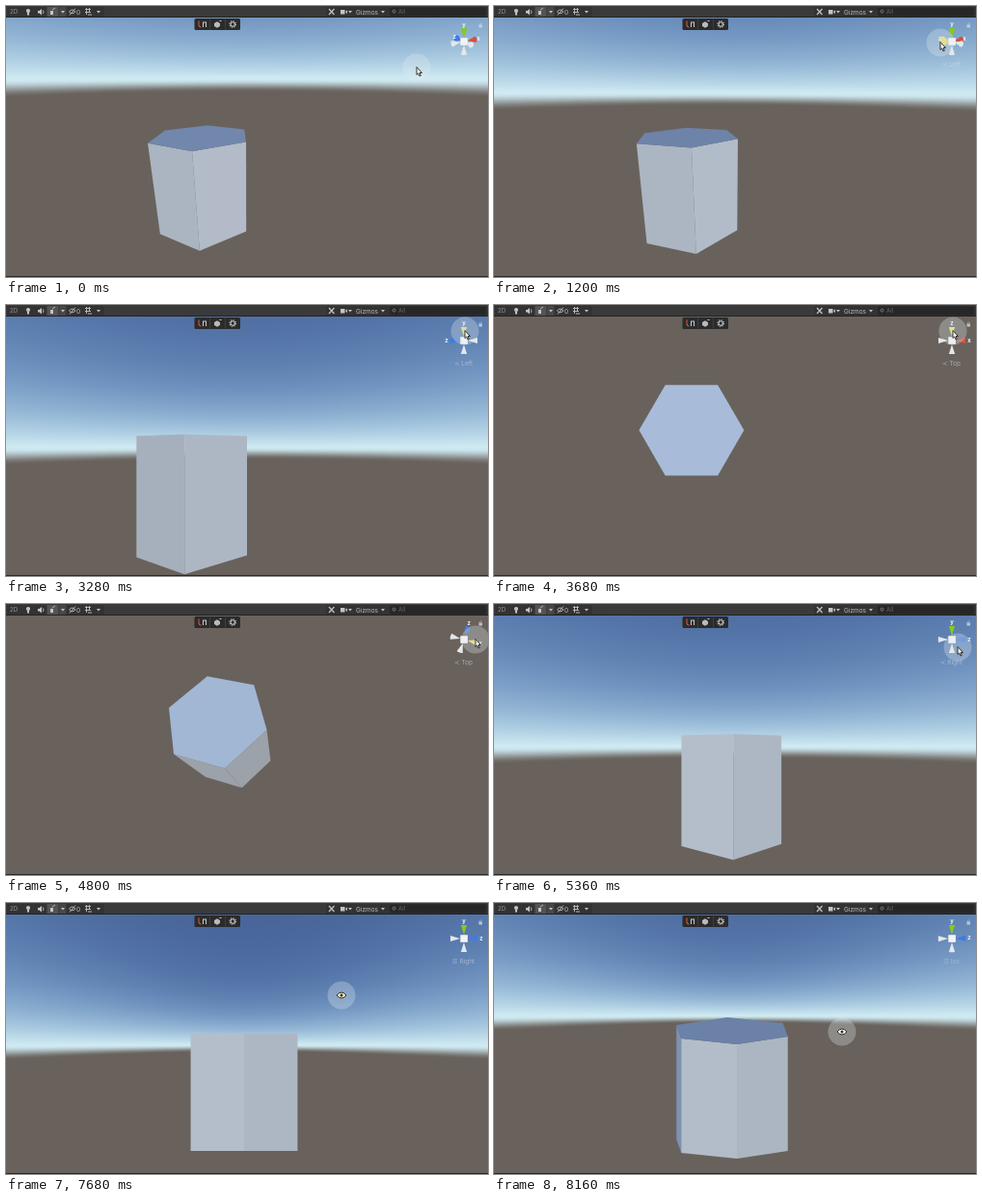
Write an HTML page with a canvas that moves like this. It is 500 px wide and 282 px high and loops after 8240 ms.

```html
<!DOCTYPE html>
<html lang="en">
<head>
<meta charset="utf-8">
<title>Scene view</title>
<style>
  html, body { margin: 0; width: 100%; height: 100%; overflow: hidden; background: #67605a; }
  canvas, svg { position: absolute; left: 0; top: 0; width: 500px; height: 282px; display: block; }
  text { font: 6.5px Inter, Roboto, sans-serif; fill: #bbb; }
</style>
</head>
<body>
<canvas id="scene" width="500" height="282"></canvas>
<svg viewBox="0 0 500 282">
  <rect width="500" height="11" fill="#3a3a3a"/>
  <rect y="11" width="500" height="1" fill="#232323"/>
  <rect y="281" width="500" height="1" fill="#2b2928"/>
  <rect x="1" y="1" width="101" height="10" fill="#333"/>
  <rect x="332" y="1" width="168" height="10" fill="#333"/>
  <rect x="42.5" y="1" width="11.5" height="10" fill="#545454"/>
  <rect x="54.5" y="1" width="8" height="10" fill="#474747"/>
  <rect x="398" y="1.5" width="100" height="9" rx="2" fill="#272727"/>
  <text x="4" y="8.4" style="font-size:6px;fill:#999">2D</text>
  <text x="73" y="8.6">0</text>
  <text x="363" y="8.6">Gizmos</text>
  <text x="407" y="8.4" style="font-size:6px;fill:#666">All</text>
  <!-- solid icons -->
  <g fill="#c4c4c4">
    <circle cx="23" cy="5" r="2.1"/><path d="M22 6.5h2v3h-2z"/>
    <path d="M33 5h1.6l2.4-2v6.6l-2.4-2H33z"/>
    <path d="M46 5h3v4h-3z"/>
    <path d="M347 4h4.500v4.500H347zM352 6l2-1.800v4z"/>
    <path id="arrow" d="M57 5h4l-2 2.600z"/>
    <use href="#arrow" x="37"/><use href="#arrow" x="298"/><use href="#arrow" x="332"/>
  </g>
  <!-- line icons -->
  <g fill="none" stroke="#c0c0c0" stroke-width=".9">
    <path d="M38.300 4.400q1.400 1.800 0 3.600M48 4l3-2"/>
    <path d="M65.500 6q3-4 6.500 0-3.500 3.500-6.500 0M66 9.500l6-7"/>
    <path d="M82 3.500h6M82 6.500h6M83.500 2v7M86.500 2v5M85 9h4"/>
    <path d="M335 3l5.500 6M340.500 3l-5.500 6" stroke-width="1.300"/>
    <circle cx="402.500" cy="5.600" r="1.500" stroke="#888"/>
  </g>
  <!-- floating tools -->
  <rect x="195.500" y="13" width="47.500" height="12" rx="1.500" fill="#2b2b2b"/>
  <g fill="none" stroke="#c4c4c4" stroke-width="1.100">
    <path d="M211.500 13.500v11M227.500 13.500v11" stroke="#444" stroke-width=".8"/>
    <path d="M200 15.500v4q0 2.500 2.500 2.500" stroke="#d2553a"/>
    <path d="M204.500 22v-5h3v5M221.500 15.500h2"/>
    <path d="M216 18l3-1.700 3 1.700v3l-3 1.700-3-1.700z" fill="#bbb" stroke="none"/>
    <circle cx="235.200" cy="19" r="2.200"/>
    <circle cx="235.200" cy="19" r="3.300" stroke-dasharray="1.200 1.390"/>
  </g>
  <g opacity=".8">
    <rect x="490.500" y="19.500" width="3.500" height="3" fill="#d3d8de"/>
    <path d="M491.300 19.500v-1q1-1.500 2 0v1" fill="none" stroke="#d3d8de" stroke-width=".6"/>
  </g>
</svg>
<script>
const ctx = document.getElementById('scene').getContext('2d');
const LOOP = 8240, STEP = 80;
const W = 500, TOP = 12, BOTTOM = 281, CX = 250, CY = 146.5;
const FOCAL = 234, ISO_FOCAL = 135;
const RADIUS = 64, HALF = 61;
const RAD = Math.PI / 180;

const clamp = v => Math.min(1, Math.max(0, v));
const smooth = t => t * t * (3 - 2 * t);
const easeIn = t => t * t;
const mix = (a, b, k) => a.map((v, i) => v + (b[i] - v) * k);
const blend = (a, b, k) =>
  Object.fromEntries(Object.keys(a).map(key => [key, a[key] + (b[key] - a[key]) * k]));
const rgb = c => `rgb(${c.map(Math.round)})`;

// Camera angles, prism centre seen from the camera, and amount of perspective.
const home = { yaw: 32.5, pitch: 17.2, roll: 0, x: -57.8, y: -44, z: 305, persp: 1 };
const left = { ...home, yaw: 92, pitch: 0, x: -56.5, y: -51, z: 260 };
const nearLeft = { ...left, yaw: 91, roll: -1.1, x: -61, z: 262 };
const above = { ...left, yaw: 0, pitch: 90, x: -53, y: 19, z: 336 };
const tilted = { ...above, yaw: -36.6, pitch: 68, roll: 20.6, x: -30, y: 10.5, z: 327 };
const right = { ...left, yaw: -90, x: -3, y: -50.5, z: 282 };
const nearRight = { ...right, yaw: -87, x: -5 };
const iso = { ...right, persp: 0 };
const orbited = { ...iso, yaw: -85.5, pitch: 12.7, y: -46 };

// Each move: start, end, goal, easing.
const CAMERA = [
  [1040, 1600, nearLeft], [1600, 1840, left], [3320, 3680, above],
  [4600, 4800, tilted, easeIn], [4800, 5360, nearRight], [5360, 5520, right],
  [6300, 6700, iso], [7680, 8160, orbited, easeIn]
];
const spot = (x, y) => ({ x, y });
const POINTER = [
  [240, 880, spot(463, 38)], [1840, 2960, spot(476, 27)], [3680, 4400, spot(487, 37)],
  [4880, 5360, spot(481, 45)], [5440, 6160, spot(475, 40)],
  [6640, 7440, spot(348, 96)], [7680, 8160, spot(361, 134), easeIn]
];
const LABELS = [
  [0, 'Persp', .12], [1200, '≺ Left', .5], [3440, '≺ Top', .55],
  [4960, '≺ Right', .5], [6480, '☰ Right', .5], [7760, '☰ Iso', .35]
];

function follow(from, moves, t) {
  return moves.reduce((now, [start, end, goal, ease = smooth]) =>
    t <= start ? now : blend(now, goal, ease(clamp((t - start) / (end - start)))), from);
}

// Sky fades from the horizon to the zenith, each channel at its own rate.
const ZENITH = [70, 95, 143], HORIZON = [206, 233, 241], GROUND = [105, 98, 92];
const FADE = [11.5, 14, 19];
function skyColour(deg) {
  const up = Math.max(0, deg);
  const sky = HORIZON.map((h, i) => ZENITH[i] + (h - ZENITH[i]) * Math.exp(-up / FADE[i]));
  return mix(sky, GROUND, smooth(clamp((-.3 - deg) / 3)));
}
const SHADES = 4096;
const shades = Array.from({ length: SHADES + 1 }, (_, i) =>
  skyColour(Math.asin(2 * i / SHADES - 1) / RAD));
const sky = ctx.createImageData(W, BOTTOM - TOP);

function drawSky({ pitch, roll, persp }) {
  const focal = ISO_FOCAL + (FOCAL - ISO_FOCAL) * persp;
  const sp = Math.sin(pitch * RAD), cp = Math.cos(pitch * RAD);
  const sr = Math.sin(roll * RAD), cr = Math.cos(roll * RAD);
  let at = 0;
  for (let row = TOP; row < BOTTOM; row++) {
    for (let col = 0; col < W; col++) {
      const x = col - CX, y = CY - row;
      const rise = (y * cr - x * sr) * cp - focal * sp;
      const sine = rise / Math.hypot(x, y, focal);
      const c = shades[Math.round((sine + 1) / 2 * SHADES)];
      sky.data[at++] = c[0];
      sky.data[at++] = c[1];
      sky.data[at++] = c[2];
      sky.data[at++] = 255;
    }
  }
  ctx.putImageData(sky, 0, TOP);
}

function makeView(pose) {
  const [sy, cy, sp, cp, sr, cr] = [pose.yaw, pose.pitch, pose.roll]
    .flatMap(a => [Math.sin(a * RAD), Math.cos(a * RAD)]);
  const turn = ([vx, vy, vz]) => {
    const x1 = vx * cy - vz * sy, z1 = vx * sy + vz * cy;
    const y2 = vy * cp + z1 * sp, z2 = z1 * cp - vy * sp;
    return [x1 * cr - y2 * sr, x1 * sr + y2 * cr, z2];
  };
  const project = v => {
    const p = turn(v);
    const s = 1 / (1 + (p[2] + pose.z - FOCAL) * pose.persp / FOCAL);
    return [CX + (p[0] + pose.x) * s, CY - (p[1] + pose.y) * s];
  };
  return { ...pose, turn, project };
}

function fillPoly(pts, colour) {
  ctx.beginPath();
  pts.forEach(p => ctx.lineTo(...p));
  ctx.closePath();
  ctx.fillStyle = colour;
  ctx.fill();
}

const area = pts => pts.reduce((sum, p, i) => {
  const q = pts[(i + 1) % pts.length];
  return sum + p[0] * q[1] - q[0] * p[1];
}, 0);

function drawPrism(view) {
  const around = i => [Math.cos(i * 60 * RAD), Math.sin(i * 60 * RAD)];
  const ring = h => Array.from({ length: 6 }, (_, i) => {
    const [c, s] = around(i);
    return view.project([RADIUS * c, h, RADIUS * s]);
  });
  const top = ring(HALF), base = ring(-HALF);
  const down = Math.sin(view.pitch * RAD);
  for (let i = 0; i < 6; i++) {
    const j = (i + 1) % 6, [nx, nz] = around(i + .5);
    const quad = [top[i], top[j], base[j], base[i]];
    if (area(quad) <= 0) continue;
    const facing = -view.turn([nx, 0, nz])[2];
    const s = 176 + 8 * (nx * .5 - nz * .87);
    const lit = mix([s - 3, s + 7, s + 20], [140, 143, 146], down * down * .7);
    const grazing = facing < .25 && down < .5;
    fillPoly(quad, rgb(grazing ? [125, 145, 176] : lit));
  }
  if (area(top) < 0) fillPoly(top, rgb(mix([90, 113, 153], [168, 188, 217], down)));
}

const AXES = ['x', 'y', 'z'].flatMap((name, i) => {
  const dir = sign => [0, 1, 2].map(k => k === i ? sign : 0);
  return [
    { name, dir: dir(1), colour: ['#d9503c', '#86c920', '#3f7be6'][i] },
    { name: '', dir: dir(-1), colour: '#e4e7ea' }
  ];
});

function drawCone({ name, p, colour }, mouse) {
  const len = Math.hypot(p[0], p[1]);
  if (len < .45) return;
  const at = d => [475 + p[0] * d, 37 - p[1] * d];
  const [bx, by] = at(14), w = 3.1;
  const nx = p[1] / len * w, ny = p[0] / len * w;
  const hover = Math.hypot(bx - mouse.x, by - mouse.y) < 7;
  fillPoly([at(4), [bx + nx, by + ny], [bx - nx, by - ny]], hover ? '#e6da6a' : colour);
  ctx.beginPath();
  ctx.ellipse(bx, by, Math.abs(p[2]) * w, w, Math.atan2(-p[1], p[0]), 0, 7);
  ctx.fill();
  ctx.fillStyle = '#eef2f5';
  ctx.font = 'bold 6px Inter, Roboto, sans-serif';
  ctx.fillText(name, ...at(18));
}

function drawGizmo(view, mouse, t) {
  const cones = AXES.map(a => ({ ...a, p: view.turn(a.dir) })).sort((a, b) => b.p[2] - a.p[2]);
  ctx.textAlign = 'center';
  ctx.textBaseline = 'middle';
  cones.filter(c => c.p[2] > 0).forEach(c => drawCone(c, mouse));
  ctx.fillStyle = '#f2f3f4';
  ctx.fillRect(471.3, 33.2, 7.6, 7.6);
  cones.filter(c => c.p[2] <= 0).forEach(c => drawCone(c, mouse));

  const [, text, alpha] = LABELS.filter(l => l[0] <= t).pop();
  ctx.fillStyle = `rgba(228,232,236,${alpha})`;
  ctx.font = '6.5px Inter, "DejaVu Sans", sans-serif';
  ctx.fillText(text, 474.5, 61);
}

const ARROW = new Path2D('M0-.5V7.500L1.700 6 3 9 4.300 8.400 3.100 5.500H5.500Z');
const EYE = new Path2D('M-5 0Q0-6 5 0Q0 6-5 0Z');

function disc(r, colour) {
  ctx.beginPath();
  ctx.arc(0, 0, r, 0, 7);
  ctx.fillStyle = colour;
  ctx.fill();
}

function drawPointer({ x, y }, t) {
  const orbiting = t >= 7520;
  const shape = orbiting ? EYE : ARROW;
  ctx.save();
  ctx.translate(x, y);
  disc(14.5, 'rgba(225,235,240,.3)');
  ctx.lineWidth = .9;
  ctx.strokeStyle = '#222';
  ctx.fillStyle = orbiting && t < 7760 ? '#f3ecb0' : '#f4f4f2';
  ctx.fill(shape);
  ctx.stroke(shape);
  if (orbiting) disc(1.5, '#333');
  ctx.restore();
}

function draw(t) {
  const view = makeView(follow(home, CAMERA, t));
  const mouse = follow(spot(426, 64), POINTER, t);
  drawSky(view);
  drawPrism(view);
  drawGizmo(view, mouse, t);
  drawPointer(mouse, t);
}

const start = performance.now();
let shown = -1;
function tick() {
  const t = Math.floor((performance.now() - start) % LOOP / STEP) * STEP;
  if (t !== shown) draw(shown = t);
  requestAnimationFrame(tick);
}
tick();
</script>
</body>
</html>
```
